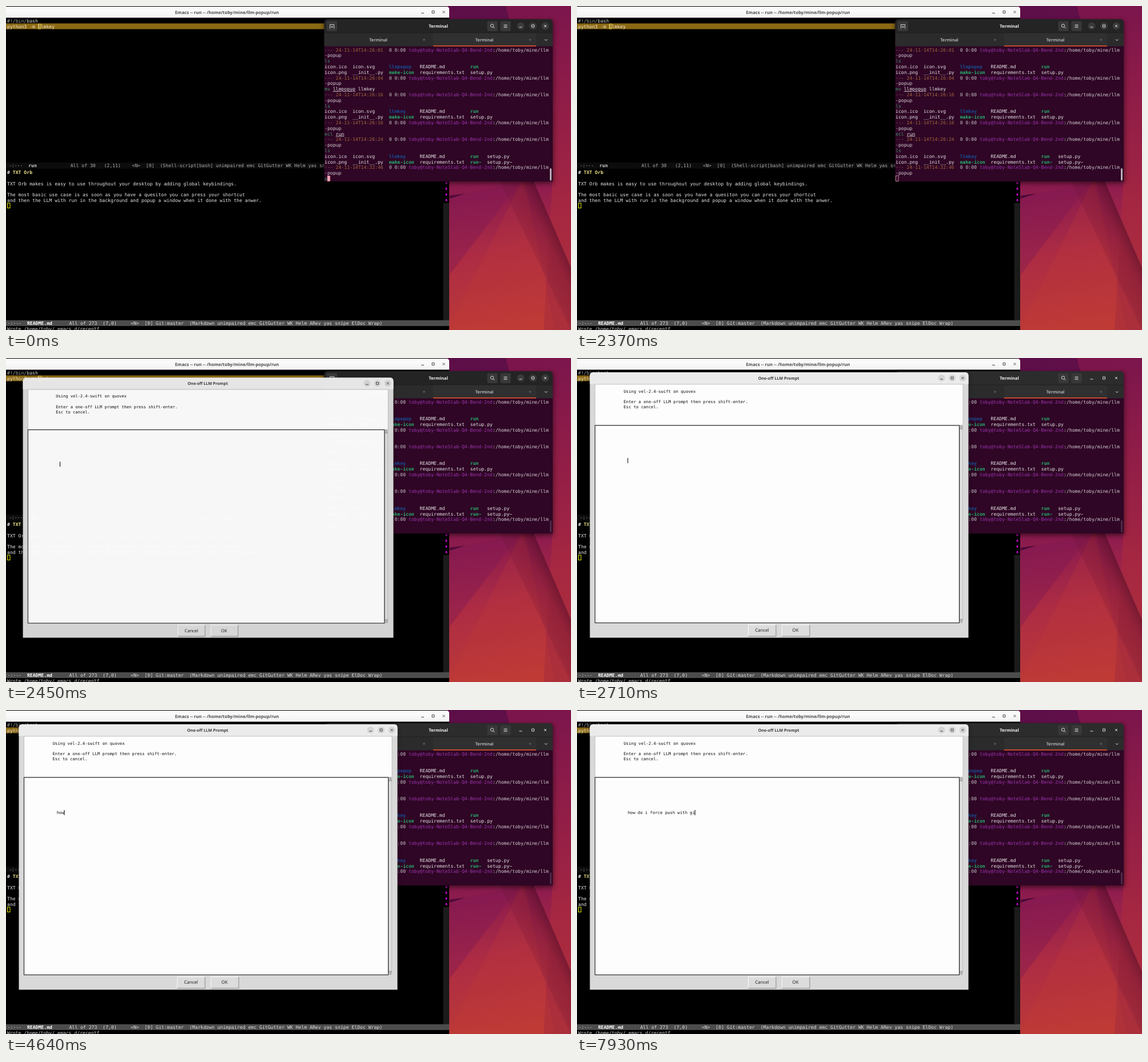
An HTML page for the animation above (8 s loop, 988 by 567 pixels).

```html
<!DOCTYPE html>
<html lang="en">
<head>
<meta charset="utf-8">
<title>Desktop prompt</title>
<style>
  html, body { margin: 0; width: 100%; height: 100%; overflow: hidden; background: #000; }
  svg { display: block; width: 988px; height: 567px; }
  text { white-space: pre; text-rendering: geometricPrecision; }
  .mono { font-family: "DejaVu Sans Mono", monospace; font-size: 8.139px; }
  .small { font-size: 7.225px; }
  .ui { font-family: "Open Sans", "Noto Sans", sans-serif; text-anchor: middle; }
</style>
</head>
<body>
<svg id="stage" viewBox="0 0 988 567" xmlns="http://www.w3.org/2000/svg">
  <defs>
    <linearGradient id="wall" gradientUnits="userSpaceOnUse" x1="790" y1="0" x2="880" y2="567">
      <stop offset="0" stop-color="#5c0e48"/><stop offset=".3" stop-color="#7c164c"/>
      <stop offset=".58" stop-color="#8d1c4e"/><stop offset=".76" stop-color="#ad2c44"/>
      <stop offset="1" stop-color="#bd3a36"/>
    </linearGradient>
    <linearGradient id="fold" gradientUnits="userSpaceOnUse" x1="880" y1="420" x2="975" y2="375">
      <stop offset="0" stop-color="#6a1130" stop-opacity="0"/><stop offset=".6" stop-color="#6a1130" stop-opacity=".35"/>
      <stop offset="1" stop-color="#430a22" stop-opacity=".9"/>
    </linearGradient>
    <linearGradient id="side" x1="0" y1="0" x2="0" y2="1">
      <stop offset="0" stop-color="#84174d"/><stop offset=".6" stop-color="#a8283f"/><stop offset="1" stop-color="#a42c3c"/>
    </linearGradient>
    <linearGradient id="bar" x1="0" y1="0" x2="0" y2="1">
      <stop offset="0" stop-color="#fdfdfd"/><stop offset="1" stop-color="#f3f3f3"/>
    </linearGradient>
    <filter id="blur" x="-20%" y="-20%" width="140%" height="140%"><feGaussianBlur stdDeviation="4"/></filter>
  </defs>
</svg>
<script>
const LOOP = 8000, CELL = 4.9;
const stage = document.getElementById('stage');

function add(parent, tag, attrs, content) {
  const el = document.createElementNS('http://www.w3.org/2000/svg', tag);
  for (const k in attrs) el.setAttribute(k, attrs[k]);
  if (content !== undefined) el.textContent = content;
  parent.appendChild(el);
  return el;
}
const group = (p, attrs = {}) => add(p, 'g', attrs);
const rect = (p, x, y, width, height, fill, more = {}) => add(p, 'rect', { x, y, width, height, fill, ...more });
const path = (p, d, stroke, more = {}) =>
  add(p, 'path', { d, stroke, fill: 'none', 'stroke-width': 1, ...more });
const shape = (p, d, fill, more = {}) => add(p, 'path', { d, fill, ...more });
const mono = (p, x, y, str, fill, more = {}) => add(p, 'text', { class: 'mono', x, y, fill, ...more }, str);
const small = (p, x, y, str) => add(p, 'text', { class: 'mono small', x, y, fill: '#111' }, str);
const label = (p, x, y, size, weight, fill, str) =>
  add(p, 'text', { class: 'ui', x, y, fill, 'font-size': size + 'px', 'font-weight': weight }, str);
const show = (el, on) => el.setAttribute('visibility', on ? 'visible' : 'hidden');
const BOLD = { 'font-weight': 700 };

// Minimise, maximise and close signs
function controls(p, xs, y, color) {
  const [a, b, c] = xs;
  path(p, `M${a - 2.5} ${y + 2}h5`, color);
  path(p, `M${b - 2} ${y - 2}h4v4h-4z`, color);
  path(p, `M${c - 2} ${y - 2}l4 4m0 -4l-4 4`, color);
}
function discs(p, xs, y, r, fill) {
  const g = group(p);
  xs.forEach(cx => add(g, 'circle', { cx, cy: y, r, fill }));
  return g;
}

function drawWallpaper() {
  rect(stage, 770, 0, 218, 567, 'url(#wall)');
  shape(stage, 'M874 0H988V567H940L956 300Z', 'url(#side)', { opacity: .75 });
  shape(stage, 'M776 560L905 300L960 567H776Z', '#c23d35', { opacity: .22 });
  shape(stage, 'M776 335L900 307L776 470Z', '#7d1853', { opacity: .4 });
  shape(stage, 'M860 300H920L988 458V567Z', 'url(#fold)');
  shape(stage, 'M776 332L804 328L776 337Z', '#4b0a36');
}

function drawEmacs() {
  const g = group(stage);
  rect(g, 0, 14, 775, 553, '#000');
  shape(g, 'M0 1H770Q775 1 775 6V20.500H0Z', 'url(#bar)');
  label(g, 386.500, 13.600, 7.65, 700, '#4a4a4a', 'Emacs -- run -- /home/toby/mine/llm-popup/run');
  controls(g, [728.500, 747, 765.500], 10.500, '#444');

  rect(g, 0, 30.500, 765, 10, '#8b6914');
  mono(g, 2, 28.900, '#!/bin/', '#a8a8a8');
  mono(g, 2 + 7 * CELL, 28.900, 'bash', '#d8d8d8');
  mono(g, 2, 38.700, 'python3 -m llmkey', '#f2ecd8');
  rect(g, 56.500, 31.500, 4, 8.500, 'none', { stroke: '#e8d84a', 'stroke-width': .8 });

  rect(g, 0, 274, 775, 10.500, '#0c0c0c');
  mono(g, 0, 281.900, ' -:---', '#b0b0b0');
  mono(g, 8 * CELL, 281.900, 'run', '#d0d0d0', BOLD);
  mono(g, 23 * CELL, 281.900, 'All of 30   (2,11)    <N>  [0]  (Shell-script[bash] unimpaired emc GitGutter WK Helm yas snipe ElDoc)', '#b0b0b0');

  mono(g, 2, 293.900, '#', '#e6e6e6', BOLD);
  mono(g, 2 + 2 * CELL, 293.900, 'TXT Orb', '#f0e68c', BOLD);
  [[313.500, 'TXT Orb makes is easy to use throughout your desktop by adding global keybindings.'],
   [333, 'The most basic use case is as soon as you have a quesiton you can press your shortcut'],
   [342.800, 'and then the LLM with run in the background and popup a window when it done with the anwer.']]
    .forEach(([y, s]) => mono(g, 2, y, s, '#e8e8e8'));
  rect(g, 2.500, 345, 4.500, 8.500, 'none', { stroke: '#e6e600', 'stroke-width': 1 });
  for (let y = 310; y <= 340; y += 10) rect(g, 768.700, y - 2, 2.600, 3.500, '#d400d4');
  rect(g, 764.500, 345, 10.500, 205, '#1b1b1b');

  rect(g, 0, 550, 775, 10, '#4c4c4c');
  mono(g, 2.600, 558.400, '-:---', '#e0e0e0');
  mono(g, 2.600 + 7 * CELL, 558.400, 'README.md', '#fff', BOLD);
  mono(g, 2.600 + 22 * CELL, 558.400, 'All of 273  (7,0)     <N>  [0] Git:master  (Markdown unimpaired emc GitGutter WK Helm ARev yas snipe ElDoc Wrap)', '#e0e0e0');
  mono(g, 2, 568, 'Wrote /home/toby/.emacs.d/recentf', '#dcdcdc');
}

function drawTerminal() {
  const g = group(stage), WHITE = '#e6e3e6', GREEN = '#26b06e', DIM = '#3b9468', BLUE = '#174f96';
  rect(g, 556, 26, 401, 284, '#000', { opacity: .55, filter: 'url(#blur)' });
  shape(g, 'M556.500 307V30Q556.500 23 563.500 23H949Q956 23 956 30V307Z', '#2f0625');
  const head = shape(g, 'M556.500 47V30Q556.500 23 563.500 23H949Q956 23 956 30V47Z', '#242424');
  rect(g, 556.500, 47, 399.500, 23.500, '#2b2b2b');
  rect(g, 747, 47, 180, 23.500, '#303030');
  rect(g, 747, 69, 180, 1.700, '#d9502c');
  path(g, 'M556.500 47H956', '#1c1c1c', { 'stroke-width': .8 });

  [[560.500, 18.500], [841.500, 18], [864.500, 18]].forEach(([x, w]) => rect(g, x, 26.500, w, 17.500, '#383838', { rx: 2.500 }));
  path(g, 'M566.500 39.500V32.500H573.500V39.500M568.300 36.500h3.400M570 34.800v3.400', '#ddd', { 'stroke-width': .9 });
  add(g, 'circle', { cx: 850, cy: 34.500, r: 2.700, fill: 'none', stroke: '#ddd' });
  path(g, 'M852 36.500l2.500 2.500', '#ddd');
  path(g, 'M870.500 33h6M870.500 35.300h6M870.500 37.600h6', '#ddd', { 'stroke-width': .9 });
  const xs = [900, 921.500, 943];
  const rings = discs(g, xs, 35, 6.500, '#3a3a3a');
  controls(g, xs, 35, '#ddd');
  label(g, 756, 37.900, 7.6, 700, '#f4f4f4', 'Terminal');
  label(g, 651, 62, 7.5, 600, '#cfcfcf', 'Terminal');
  label(g, 836.500, 62, 7.5, 600, '#cfcfcf', 'Terminal');
  [731, 916.500].forEach(x => path(g, `M${x - 1.500} 57.700l3 3m0 -3l-3 3`, '#8c8c8c', { 'stroke-width': .8 }));
  path(g, 'M941.800 58.300l2.400 2.400l2.400 -2.400', '#ddd');

  let row = 0;
  const line = (...spans) => {
    const y = 79.600 + row++ * 9.8;
    spans.forEach(([col, s, fill, more]) => mono(g, 557 + col * CELL, y, s, fill, more));
  };
  const prompt = time => {
    line([0, '---', '#97605c'], [4, '24-11-14T' + time, '#a2683f'], [23, '0 0:00', '#c9c3c9'],
      [30, 'toby@toby-NoteSlab-Q4-Bend-2nd', '#9c36b0'], [60, ':/home/toby/mine/llm', '#d6d0d6']);
    line([0, '-popup', '#d6d0d6']);
  };
  const list = (dir, ...tail) => {
    line([0, 'ls', DIM]);
    line([0, 'icon.ico  icon.svg', WHITE], [23, dir, BLUE, BOLD], [34, 'README.md', WHITE],
      [52, 'run', GREEN, BOLD], [58, tail[0] || '', WHITE]);
    line([0, 'icon.png  __init__.py', WHITE], [23, 'make-icon', GREEN, BOLD], [34, 'requirements.txt', WHITE],
      ...(tail.length ? [[52, 'run~', GREEN, BOLD], [58, tail[1], WHITE]] : [[52, 'setup.py', WHITE]]));
  };
  const LINK = { 'text-decoration': 'underline' };
  prompt('14:26:01'); list('llmpopup');
  prompt('14:26:04'); line([0, 'mv', DIM], [3, 'llmpopup', WHITE, LINK], [12, 'llmkey', WHITE]);
  prompt('14:26:16'); list('llmkey');
  prompt('14:26:16'); line([0, 'ecl', DIM], [4, 'run', WHITE, LINK]);
  prompt('14:26:24'); list('llmkey', 'setup.py', 'setup.py~');
  prompt('14:32:46');

  const typed = mono(g, 557, 305, 'o', DIM);
  const block = rect(g, 557, 297, CELL, 9.800, '#f5a3b5');
  const hollow = rect(g, 557.500, 297, 4.500, 9.500, 'none', { stroke: '#d9a7b5', 'stroke-width': .8 });
  const thumb = rect(g, 951, 284, 3, 21.500, '#b9b0b8', { rx: 1.500 });
  return { head, rings, typed, block, hollow, thumb };
}

function drawDialog() {
  const g = group(stage);
  rect(g, 22, 28, 662, 463, '#000', { opacity: .4, filter: 'url(#blur)' });
  shape(g, 'M22.500 489.500V31Q22.500 25 28.500 25H678.500Q684.500 25 684.500 31V489.500Z', '#d9d9d9');
  shape(g, 'M22.500 45.500V31Q22.500 25 28.500 25H678.500Q684.500 25 684.500 31V45.500Z', '#ebebeb');
  label(g, 352.700, 38, 7.15, 700, '#3a3a3a', 'One-off LLM Prompt');
  const xs = [637.500, 656, 674.500];
  discs(g, xs, 35, 6, '#d6d6d6');
  controls(g, xs, 35, '#444');

  rect(g, 31.500, 46, 643.500, 71.500, '#fdfdfd', { stroke: '#b0b0b0', 'stroke-width': .7 });
  small(g, 81.500, 60.700, 'Using vel-2.4-swift on quovex');
  small(g, 81.500, 79.100, 'Enter a one-off LLM prompt then press shift-enter.');
  small(g, 81.500, 88.300, 'Esc to cancel.');

  rect(g, 669, 118, 6, 345.500, '#c6c6c6');
  rect(g, 669.500, 124, 5, 333, '#dedede', { stroke: '#a9a9a9', 'stroke-width': .5 });
  path(g, 'M669.500 124L672 118.500L674.500 124ZM669.500 457.500L672 463L674.500 457.500Z', '#888', { 'stroke-width': .7 });
  rect(g, 31.500, 118, 637, 345.500, '#fdfdfd', { stroke: '#222', 'stroke-width': 1.1 });

  [[299.500, 'Cancel', 323.500], [358.500, 'OK', 382]].forEach(([x, s, mid]) => {
    rect(g, x, 467, 48.500, 20, '#dcdcdc');
    path(g, `M${x} 487V467H${x + 48.500}`, '#f8f8f8');
    path(g, `M${x} 487H${x + 48.500}V467`, '#8a8a8a');
    label(g, mid, 479.300, 7.8, 500, '#111', s);
  });
  const input = small(g, 88.700, 182.100, '');
  const caret = rect(g, 88, 175, 1.100, 9, '#111');
  return { g, input, caret };
}

drawWallpaper();
drawEmacs();
const term = drawTerminal();
const dialog = drawDialog();

const PHRASE = 'how do i force push with gi';
const KEYS = [4470, 4550, 4610, 4700, 4940, 5020, 5090, 5230, 5320, 5560, 5870, 5930, 6150, 6240, 6340,
  6820, 6900, 6970, 7040, 7110, 7190, 7270, 7350, 7430, 7530, 7750, 7930];
const BLINKS = [360, 760, 1200, 1380, 1780, 2190];
const OPENING = [2410, 2450, 2480, 2520];
const passed = (times, t) => times.filter(s => s <= t).length;

function render(t) {
  const active = t < 2190;
  show(term.typed, t < 90);
  term.block.setAttribute('x', t < 90 ? 557 + CELL : 557);
  show(term.block, active && passed(BLINKS, t) % 2 === 0);
  show(term.hollow, !active);
  term.thumb.setAttribute('fill', t < 2410 ? '#b9b0b8' : '#4d2a45');
  show(term.rings, t < 2520);
  term.head.setAttribute('fill', t < 2520 ? '#242424' : '#2c2c2c');

  // Window grows from its bottom edge with an exponential ease-out
  const step = passed(OPENING, t);
  show(dialog.g, step > 0);
  if (!step) { show(dialog.caret, false); return; }
  const p = (OPENING[step - 1] - 2367) / 150;
  const e = p >= 1 ? 1 : 1 - 2 ** (-10 * p);
  dialog.g.setAttribute('opacity', e);
  dialog.g.setAttribute('transform',
    `translate(353.500 489.500) scale(${.01 + .99 * e} ${.05 + .95 * e}) translate(-353.500 -489.500)`);

  const n = passed(KEYS, t);
  dialog.input.textContent = PHRASE.slice(0, n);
  dialog.caret.setAttribute('x', 88.300 + n * 4.35);
  show(dialog.caret, (t - 2390) % 900 < 600);
}

function tick() {
  render(performance.now() % LOOP);
  requestAnimationFrame(tick);
}
tick();
</script>
</body>
</html>
```
